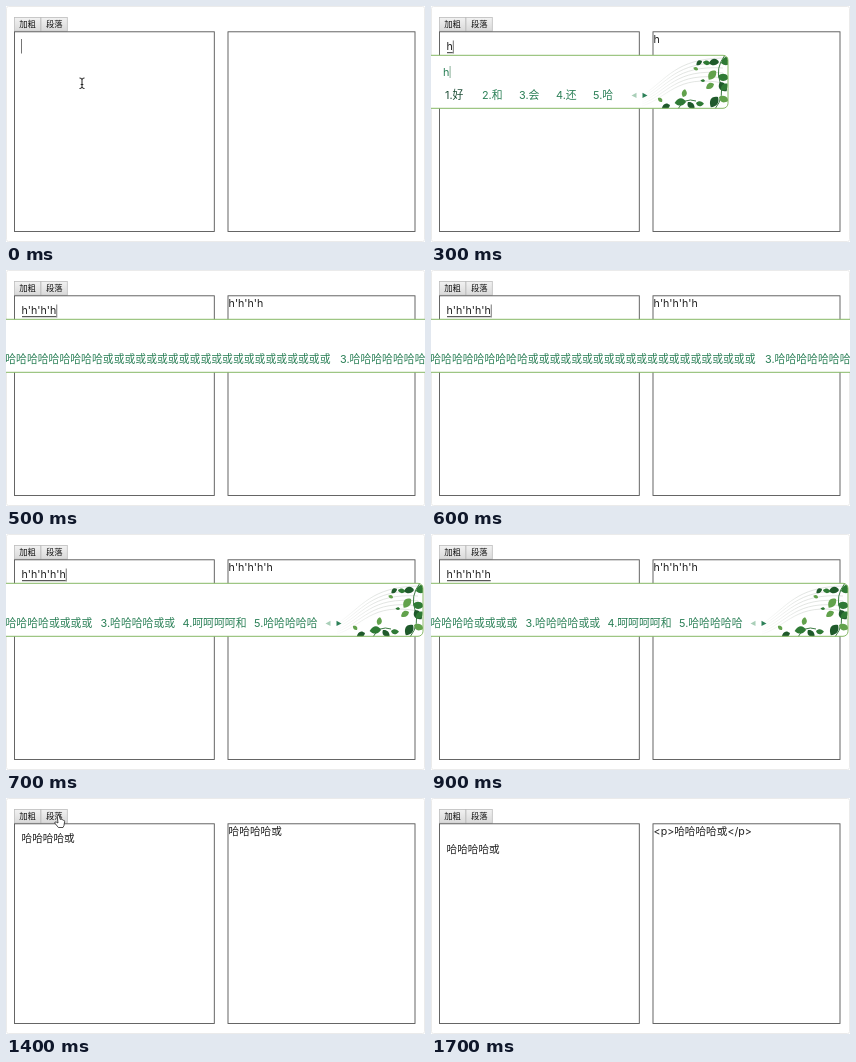
Write an HTML page that moves like this. It is 419 by 236 pixels and loops after 2 s.

```html
<!DOCTYPE html>
<html lang="zh">
<head>
<meta charset="utf-8">
<style>
html, body { margin: 0; width: 100%; height: 100%; overflow: hidden; background: #fff; }
svg { display: block; width: 100vw; height: 100vh; }
text { font-family: Inter, "Noto Sans CJK SC", "Noto Sans CJK", sans-serif; font-size: 10.65px; fill: #222; white-space: pre; }
.btn { font-size: 8.3px; fill: #111; }
.ime text { font-size: 10.85px; fill: #2c8058; }
.ime .first { fill: #1d4d36; }
</style>
</head>
<body>
<svg viewBox="0 0 419 236">
  <defs>
    <linearGradient id="face" x1="0" y1="0" x2="0" y2="1">
      <stop offset="0" stop-color="#f2f2f2"/><stop offset="1" stop-color="#d9d9d9"/>
    </linearGradient>
    <linearGradient id="veil">
      <stop offset="0" stop-color="#fff"/><stop offset="1" stop-color="#fff" stop-opacity="0"/>
    </linearGradient>
    <clipPath id="clip"><rect x="-90" y="49" width="90" height="53.5" rx="5"/></clipPath>
    <path id="leaf" d="M0 0C2 -5 7 -6 11 -3C9 3 4 5 0 0Z"/>
    <g id="art" clip-path="url(#clip)"></g>
  </defs>
  <rect width="419" height="236" fill="#fff"/>
  <rect x=".5" y=".5" width="418" height="235" rx="2" fill="none" stroke="#ebebeb"/>
  <g fill="url(#face)" stroke="#bdbdbd" stroke-width=".8">
    <rect x="8.5" y="11.4" width="26.3" height="13.8"/>
    <rect x="35" y="11.4" width="26.3" height="13.8"/>
  </g>
  <text class="btn" x="13.3" y="21.2">加粗</text>
  <text class="btn" x="40" y="21.2">段落</text>
  <g fill="#fff" stroke="#555" stroke-width=".9">
    <rect x="8.5" y="25.8" width="199.8" height="199.7"/>
    <rect x="222" y="25.8" width="187" height="199.7"/>
  </g>
  <text id="left" x="15.5"></text>
  <text id="right" x="222.6" y="37.3"></text>
  <path id="line" stroke="#333" stroke-width="1"/>
  <path id="caret" stroke="#666" stroke-width=".9"/>
  <g id="ime" class="ime"></g>
  <g id="beam" fill="none" stroke="#222" stroke-width="1">
    <path d="M-2.5 -5Q0 -5 0 -3.5Q0 -5 2.5 -5M0 -4V4.5M-2.5 5.5Q0 5.5 0 4Q0 5.5 2.5 5.5M-1.3 1.5H1.3"/>
  </g>
  <path id="hand" fill="#fff" stroke="#222" stroke-width=".8" stroke-linejoin="round"
    d="M-1.8 -5Q-.6 -6.4 .4 -5L1.2 -1.6Q2.4 -2.4 3 -1.2Q4 -1.7 4.5 -.6Q5.6 -.8 5.6 .6L5 4.5L4 6.5H-.6L-4.3 2Q-4.2 .3 -2.7 1.1L-1 2Z"/>
</svg>
<script>
const $ = id => document.getElementById(id);
const rep = (s, n) => s.repeat(n);
const word = "哈哈哈哈或";
const keys = n => Array(n).fill("h").join("'");

// Vine corner, drawn leftwards from the panel's right edge.
function drawArt() {
  let s = "";
  for (let i = 0; i < 6; i++)
    s += `<path d="M-86 ${100 - i * 2}C-60 ${92 - i * 4} -52 ${68 - i * 3} -5 ${77 - i * 5}" fill="none" stroke="#cfd4cf" stroke-width=".6"/>`;
  s += `<rect x="-90" y="49" width="45" height="54" fill="url(#veil)"/>`;
  s += `<path d="M-3 49Q-13 62 -8 76T-13 103M-50 103Q-44 91 -32 95" fill="none" stroke="#3c7a42" stroke-width="1"/>`;
  const leaves = [
    [-7, 57, -10, 1.1], [-9, 56, 190, .9], [-12, 65, 145, 1], [-10, 70, 25, 1], [-8, 76, 70, 1],
    [-14, 78, 165, .8], [-7, 84, -30, .8], [-10, 91, 140, 1.1], [-9, 91, 35, .9], [-18, 58, 210, .65],
    [-26, 55, 160, .6], [-30, 64, 220, .45], [-42, 96, 190, 1], [-40, 96, 60, .8], [-45, 91, -60, .7],
    [-32, 97, 20, .7], [-58, 99, 170, .8], [-66, 96, 240, .5], [-23, 75, 200, .4]];
  leaves.forEach(([x, y, a, k], i) => {
    const c = ["#2f7a35", "#1f5a2b", "#62a24c"][i % 3];
    s += `<use href="#leaf" transform="translate(${x} ${y}) rotate(${a}) scale(${k})" fill="${c}"/>`;
  });
  $("art").innerHTML = s;
}

const arrows = x =>
  `<path d="M${x + 2.5} 86.8V92L${x - 2.5} 89.4Z" fill="#a9cfb8"/><path d="M${x + 8.5} 86.8V92L${x + 13.5} 89.4Z" fill="#2c8058"/>`;

const grin =
  `<circle cx="105.2" cy="87.8" r="5.9" fill="#d9c343"/><circle cx="103" cy="85.6" r=".9" fill="#534a1c"/>
   <circle cx="107.4" cy="85.6" r=".9" fill="#534a1c"/><rect x="101.3" y="88" width="7.8" height="3.6" rx="1.8" fill="#fff" stroke="#6b6428" stroke-width=".6"/>
   <rect x="114.3" y="83.2" width="5.2" height="4" rx=".8" fill="none" stroke="#557a66" stroke-width=".8"/><path d="M115.5 85.2H118.3" stroke="#557a66" stroke-width=".7"/>`;

// Candidate panels: right edge, items as [x, text], optional typed keys.
const panels = {
  one: { edge: 297, typed: "h", arrow: 203,
    items: [[14, "1.好"], [51, "2.和"], [88, "3.会"], [125, "4.还"], [162, "5.哈"]] },
  two: { edge: 337, typed: keys(2), arrow: 242, extra: grin,
    items: [[14, "1.好好"], [51, "2.哈哈"], [89.5, "3."], [127.5, "4.^_^"], [156, "5.O(∩_∩)O哈哈~"]] },
  wide: { edge: 440,
    items: [[-.8, rep("哈", 9) + rep("或", 21)], [334, "3." + rep("哈", 9)]] },
  five: { edge: 417, arrow: 322,
    items: [[-.5, "哈哈哈哈或或或或"], [94.5, "3.哈哈哈哈或或"], [176.5, "4.呵呵呵呵和"], [248, "5.哈哈哈哈哈"]] }
};

function panel(p) {
  if (!p) return "";
  let s = `<rect x="-12" y="49.3" width="${p.edge + 12}" height="53" rx="5" fill="#fff"/>`;
  if (p.edge < 420) s += `<use href="#art" x="${p.edge}"/>`;
  s += `<rect x="-12" y="49.3" width="${p.edge + 12}" height="53" rx="5" fill="none" stroke="#86b866" stroke-width="1"/>`;
  if (p.typed) {
    const w = p.typed.length > 1 ? 15.2 : 6.8;
    s += `<text x="12" y="69.5">${p.typed}</text><path d="M${12.3 + w} 60V72" stroke="#6c9c80" stroke-width=".8"/>`;
  }
  p.items.forEach(([x, t], i) => {
    s += `<text x="${x}" y="92.7"${p.typed && !i ? ' class="first"' : ""}>${t}</text>`;
  });
  return s + (p.extra || "") + (p.arrow ? arrows(p.arrow) : "");
}

// Each state holds from its time until the next one.
const states = [
  { at: 0, caret: 1, beam: [76, 77] },
  { at: 300, n: 1, caret: 1, ime: "one" },
  { at: 400, n: 2, caret: 1, ime: "two" },
  { at: 500, n: 4, caret: 1, ime: "wide" },
  { at: 600, n: 5, caret: 1, ime: "wide" },
  { at: 700, n: 5, caret: 1, ime: "five" },
  { at: 800, n: 5, ime: "five" },
  { at: 1000, text: word, caret: 1 },
  { at: 1200, text: word, beam: [76, 66] },
  { at: 1300, text: word, beam: [62, 40] },
  { at: 1400, text: word, hand: [53, 23] },
  { at: 1500, text: word, para: 1, hand: [53, 23] },
  { at: 1600, text: word, para: 1, beam: [92, 146] },
  { at: 1700, text: word, para: 1 }
];

function place(el, p) {
  el.style.display = p ? "" : "none";
  if (p) el.setAttribute("transform", `translate(${p})`);
}

let last;
function draw(t) {
  const s = states.filter(e => e.at <= t).pop();
  if (s === last) return;
  last = s;
  const txt = s.n ? keys(s.n) : s.text || "";
  $("left").textContent = txt;
  $("left").setAttribute("y", s.para ? 54.7 : 44.3);
  $("right").textContent = s.para ? `<p>${txt}</p>` : txt;
  const end = txt ? 15.5 + $("left").getComputedTextLength() : 15;
  $("line").setAttribute("d", s.n ? `M16 46.7H${end}` : "");
  $("caret").setAttribute("d", s.caret ? `M${end + .5} ${txt ? 34.5 : 33}V47.5` : "");
  $("ime").innerHTML = panel(panels[s.ime]);
  place($("beam"), s.beam);
  place($("hand"), s.hand);
}

drawArt();
const start = performance.now();
function tick() {
  draw((performance.now() - start) % 2000);
  requestAnimationFrame(tick);
}
tick();
</script>
</body>
</html>
```
